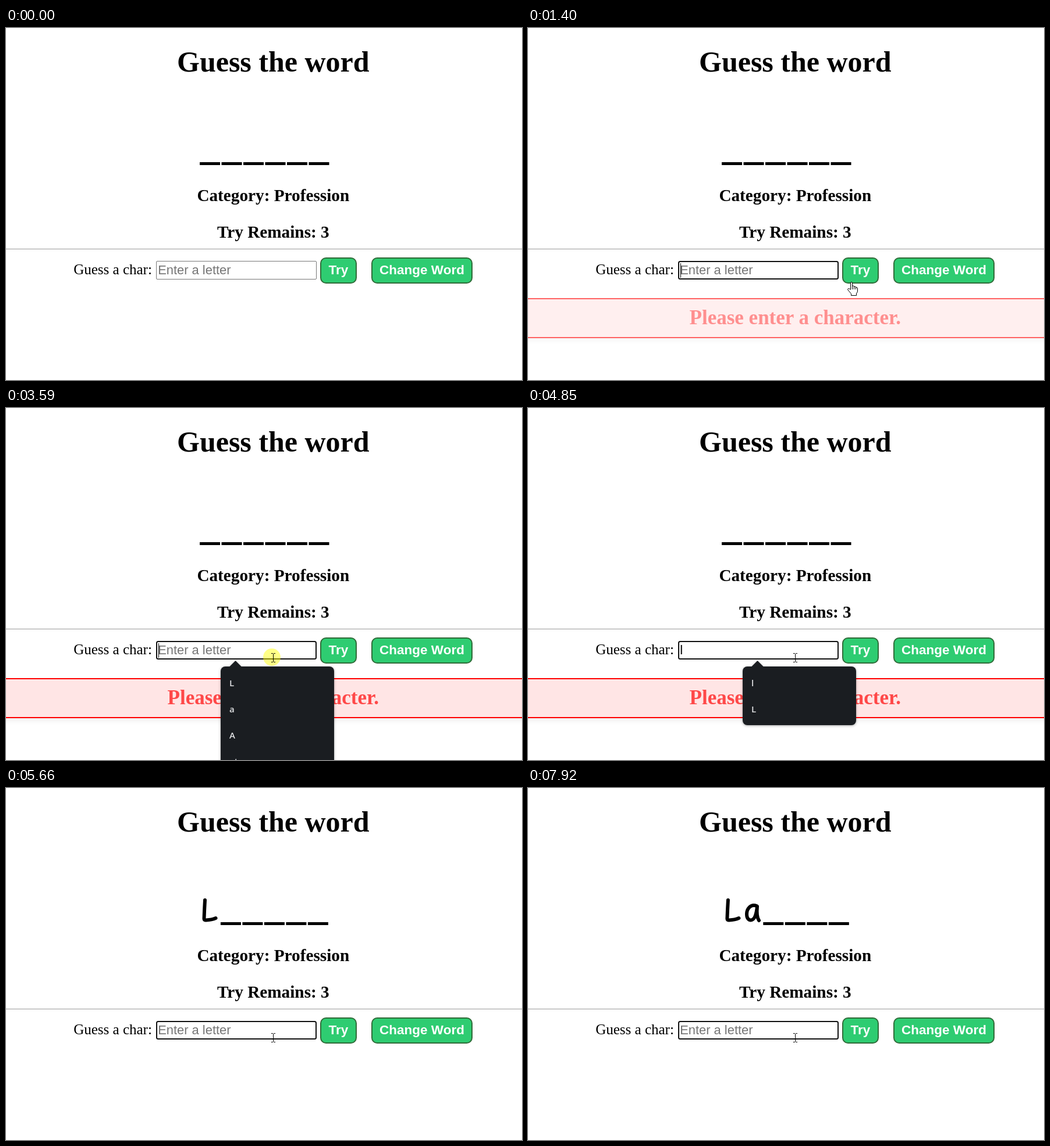
Recreate the animation shown at these times as an HTML page. Size 887x606 px, loop 8 s.

```html
<!DOCTYPE html>
<html lang="en">
<head>
<meta charset="utf-8">
<title>Guess the word</title>
<style>
  html, body { margin: 0; width: 100%; height: 100%; overflow: hidden; background: #fff; }
  svg { display: block; width: 887px; height: 606px; }
  text { white-space: pre; }
  .serif { font-family: "Liberation Serif", "Times New Roman", serif; }
  .sans { font-family: "Liberation Sans", Arial, sans-serif; }
  .bold { font-weight: bold; text-anchor: middle; }
  .h3 { font-size: 29.25px; }
  .button rect { stroke: #2f6b38; stroke-width: 2; }
  .button text { fill: #fff; font-size: 22.5px; }
  .cursor { stroke: #000; stroke-width: 1; fill: #fff; }
  #menu { filter: drop-shadow(0 1px 2px rgba(0, 0, 0, .35)); }
  #items text { font: 600 15px "Open Sans", "Noto Sans", sans-serif; fill: #e2e3e5; }
  #bar { filter: drop-shadow(0 4px 4px rgba(0, 0, 0, .07)); }
</style>
</head>
<body>
<svg viewBox="0 0 887 606">
  <text class="serif bold" x="459.3" y="75" font-size="50">Guess the word</text>
  <g id="word"></g>
  <text class="serif bold h3" x="459.3" y="298">Category: Profession</text>
  <text class="serif bold h3" x="459.3" y="361">Try Remains: 3</text>
  <rect y="380" width="887" height="1" fill="#999"/>

  <text class="serif" x="116.2" y="424" font-size="25">Guess a char:</text>
  <rect id="field" fill="#fff"/>
  <text id="value" class="sans" x="261.2" y="424" font-size="21.9"></text>
  <rect id="caret" y="405" width="1" height="25"/>

  <g class="button">
    <rect x="541" y="396" width="61" height="43" rx="9"/>
    <text class="sans bold" x="571.5" y="424">Try</text>
  </g>
  <g class="button">
    <rect x="629" y="396" width="172" height="43" rx="9"/>
    <text class="sans bold" x="715" y="424">Change Word</text>
  </g>

  <g id="message">
    <rect id="bar" x="-10" y="465" width="907" height="69" fill="#ffe5e5"/>
    <path d="M0 466H887M0 533H887" stroke="#f00" stroke-width="2"/>
    <text class="serif bold" x="459.3" y="510" font-size="35" fill="#ff4848">Please enter a character.</text>
  </g>

  <g id="menu">
    <path d="M383.5 446L394.5 435L405.5 446Z" fill="#1a1d21"/>
    <rect id="panel" x="369" y="445" width="195" rx="8" fill="#1a1d21"/>
    <g id="items"></g>
  </g>

  <circle id="click" r="15" fill="#ff0" fill-opacity=".47"/>
  <g id="pointer">
    <path id="arrow" class="cursor" d="M.5.5V16.5L4 13L6.5 18.5L9 17.5L6.5 12H11.5Z"/>
    <path id="hand" class="cursor" d="M.5 13V2Q.5 .5 2 .5T3.5 2V7.5Q5 6 6.5 7.5V9Q8 7 9.5 8.5V10Q12 8.5 12.5 11V16Q12.5 18 10.5 20V23.5H1.5V20.5L-4 14Q-5 12 -3.5 11.5T.5 13.5M3.5 7.5V13M6.5 8.5V13M9.5 9.5V13"/>
    <path id="beam" class="cursor" fill-opacity="0" d="M-3 -7.5H-.5L.5 -6.5L1.5 -7.5H4M.5 -6.5V6.5M-3 7.5H-.5L.5 6.5L1.5 7.5H4"/>
  </g>
</svg>
<script>
const LOOP = 8000;
const el = id => document.getElementById(id);
const show = (id, on) => el(id).style.display = on ? '' : 'none';
const clamp = v => Math.max(0, Math.min(1, v));
const within = (t, spans) => spans.some(([a, b]) => t >= a && t < b);
const set = (node, attrs) => {
  for (const k in attrs) node.setAttribute(k, attrs[k]);
};
const html = (id, s) => {
  const node = el(id);
  if (node.markup !== s) node.innerHTML = node.markup = s;
};

const SUBMITS = [1070, 4990, 7260];
const FOCUS = [[1140, 4990], [5190, 7260], [7400, LOOP]];
const CARET = [[1140, 1670], [2200, 2730], [3260, 4260], [4330, 4850],
  [5190, 5660], [6190, 6720], [6990, 7260], [7400, 7920]];
const CLICKS = [[810, 1070], [3590, 3790]];

// CSS "ease" curve
function ease(x) {
  const curve = (s, p, q) => 3 * (1 - s) * s * ((1 - s) * p + s * q) + s ** 3;
  let lo = 0, hi = 1;
  for (let i = 0; i < 20; i++) {
    const mid = (lo + hi) / 2;
    if (curve(mid, .25, .25) < x) lo = mid; else hi = mid;
  }
  return curve(lo, .1, 1);
}

function drawWord(found) {
  const x = 333 + [0, -1.6, .3][found];
  const glyph = d => `<path d="${d}" fill="none" stroke="#000" stroke-width="6" stroke-linecap="round" stroke-linejoin="round"/>`;
  let s = '';
  if (found) s += `<g transform="translate(${found > 1 ? 1.9 : 0})">` +
    glyph('M342 193Q341 210 340.5 225Q340.5 228 344 227.5Q354 227 360.5 224') + '</g>';
  if (found > 1) s += glyph('M393 203C383 199 376 208 376 217C376 226 381 228.5 385 227C391 225 393 213 394 204C393 214 393 222 397 228');
  for (let i = found; i < 6; i++) {
    const left = x + 37.5 * i - (found > 1 ? 4 : 0);
    s += `<rect x="${left}" y="231" width="35" height="5"/>`;
  }
  html('word', s);
}

function drawField(t, typed) {
  const focus = within(t, FOCUS), w = focus ? 2 : 1;
  set(el('field'), {
    x: 258 + w / 2, y: 401 + w / 2, width: 276 - w, height: 32 - w,
    rx: focus ? 2.5 : 1.5, stroke: focus ? '#101010' : '#767676', 'stroke-width': w
  });
  el('value').textContent = typed || 'Enter a letter';
  set(el('value'), { fill: typed ? '#000' : '#757575' });
  set(el('caret'), { x: { '': 262, l: 266, a: 273 }[typed] });
  show('caret', within(t, CARET));
}

function drawMenu(t, typed) {
  const items = { '': ['L', 'a', 'A', 'at'], l: ['l', 'L'], a: ['a', 'A', 'at'] }[typed];
  show('menu', within(t, [[3590, 4990], [6990, 7260]]));
  set(el('panel'), { height: 11 + 45 * items.length });
  html('items', items.map((s, i) => `<text x="384" y="${479 + 45 * i}">${s}</text>`).join(''));
}

function drawButtons(t) {
  const dark = Math.max(...SUBMITS.map(s => Math.min(clamp((t - s) / 110), clamp((s + 330 - t) / 130))));
  const mix = (a, b) => Math.round(a + (b - a) * dark);
  const fill = `rgb(${mix(46, 24)},${mix(204, 26)},${mix(113, 27)})`;
  document.querySelectorAll('.button rect').forEach(r => set(r, { fill }));
}

function drawPointer(t) {
  const path = [[636, 157], [554, 437], [459, 430]];
  const steps = (start, n) => clamp((Math.floor((t - start) / 66) + 1) / n);
  const leg = t < 2730 ? 0 : 1;
  const k = leg ? steps(2730, 4) : steps(340, 5);
  const [x, y] = [0, 1].map(i => path[leg][i] + (path[leg + 1][i] - path[leg][i]) * k);
  const onButton = x > 540 && x < 603 && y > 395 && y < 440;
  const onField = x > 258 && x < 534 && y > 401 && y < 433;
  show('pointer', t >= 70);
  show('hand', onButton);
  show('beam', onField);
  show('arrow', !onButton && !onField);
  set(el('pointer'), { transform: `translate(${Math.round(x)} ${Math.round(y)})` });
  set(el('click'), { cx: leg ? 457 : x, cy: leg ? 429 : y });
  show('click', within(t, CLICKS));
}

function draw(now) {
  const t = now % LOOP;
  const typed = within(t, [[4330, 4990]]) ? 'l' : within(t, [[6990, 7260]]) ? 'a' : '';
  drawWord(t < 4990 ? 0 : t < 7260 ? 1 : 2);
  drawField(t, typed);
  drawButtons(t);
  show('message', t >= 1070 && t < 4990);
  el('message').style.opacity = ease(clamp((t - 1050) / 1000));
  drawMenu(t, typed);
  drawPointer(t);
}

const start = performance.now();
function tick() {
  draw(performance.now() - start);
  requestAnimationFrame(tick);
}
tick();
</script>
</body>
</html>
```
